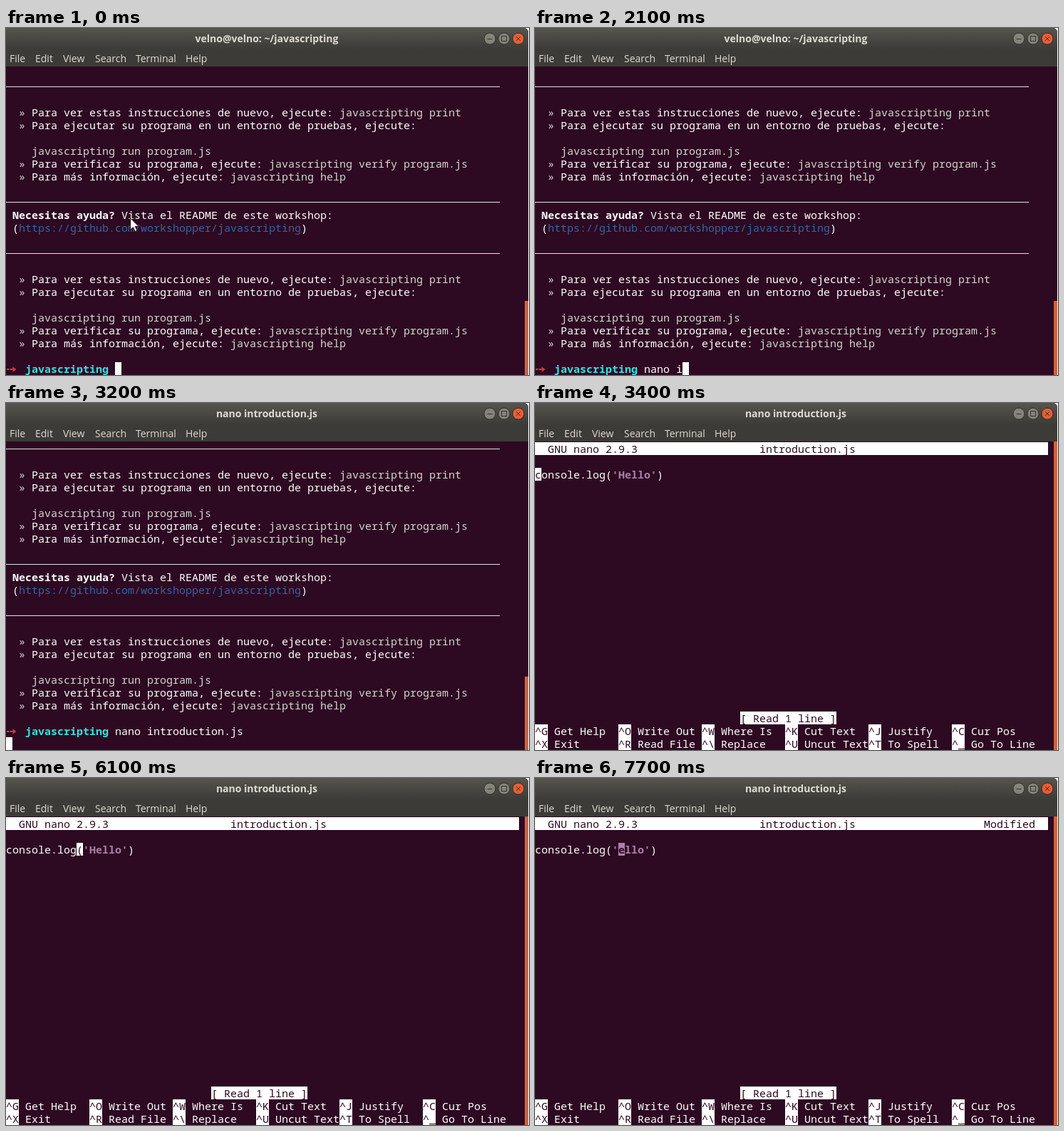
These frames come from a looping animation (734 by 487 pixels, 8000 ms). An HTML page:

```html
<!DOCTYPE html>
<html lang="es">
<head>
<meta charset="utf-8">
<title>Terminal</title>
<style>
  html, body { margin: 0; width: 100%; height: 100%; overflow: hidden; background: #fff; }
  #win { position: absolute; left: 0; top: 0; width: 733px; height: 487px; overflow: hidden;
    background: #3c3b37; border-radius: 0 6px 0 0; }
  #bar { position: absolute; width: 100%; height: 30px;
    background: linear-gradient(#56554f, #4b4a45 40%, #3c3b37); }
  #chrome { position: absolute; left: 0; top: 0; font: 14px "Open Sans", "Noto Sans", sans-serif; fill: #dfdbd2; }
  #title { font-weight: 700; text-anchor: middle; }
  #term { position: absolute; top: 54px; width: 100%; height: 433px; overflow: hidden; background: #2d0922; }
  #shell, #nano { position: absolute; left: 0; top: 1px; width: 720px; height: 432px; }
  #term span { position: absolute; height: 18px; white-space: pre; color: #fff;
    font: 15px/18px "Noto Sans Mono", "Liberation Mono", monospace; }
  #term .dim { color: #d3d7cf; }
  #term .link { color: #3465a4; }
  #term .bold { font-weight: 700; }
  #term .dir { font-weight: 700; color: #34e2e2; }
  #term .str { font-weight: 700; color: #ad7fa8; }
  #term .inv { background: #fff; color: #2d0922; }
  #term .strInv { background: #ad7fa8; color: #2d0922; font-weight: 700; }
  .rule { position: absolute; left: 0; width: 693px; height: 1px; background: #e6e1e4; }
  #arrow { position: absolute; left: 0; top: 414px; }
  #thumb { position: absolute; left: 728px; width: 5px; bottom: 0; background: #d0613a; }
  #mouse { position: absolute; left: 0; top: 0; }
</style>
</head>
<body>
<div id="win">
  <div id="bar"></div>
  <svg id="chrome" width="733" height="54">
    <text id="title" x="366" y="20"></text>
    <text x="5" y="48">File</text>
    <text x="41" y="48">Edit</text>
    <text x="80" y="48">View</text>
    <text x="125" y="48">Search</text>
    <text x="182" y="48">Terminal</text>
    <text x="252" y="48">Help</text>
    <g stroke="#32312d">
      <circle cx="679" cy="15" r="8" fill="#85837a"/>
      <circle cx="699" cy="15" r="8" fill="#85837a"/>
      <circle cx="719" cy="15" r="8" fill="#ee5c33"/>
      <path d="M675.5 15.5h7M695.5 11.5h7v7h-7zM716 12l6 6m0-6l-6 6" fill="none"/>
    </g>
  </svg>
  <div id="term">
    <div id="shell">
      <svg id="arrow" width="18" height="18">
        <path d="M1 10h3.5M5.5 10h7" stroke="#df382c" stroke-width="2"/>
        <path d="M9 6l5.5 4L9 14l1.2-4z" fill="#df382c"/>
      </svg>
    </div>
    <div id="nano"></div>
    <div id="thumb"></div>
  </div>
  <svg id="mouse" width="14" height="22">
    <path d="M.7 1v16l3.8-3.4 2.7 6 2.8-1.2-2.7-5.8h5z" fill="#fff" stroke="#1c1118"/>
  </svg>
</div>
<script>
const CELL = 9, ROW = 18, LOOP = 8000;
const $ = id => document.getElementById(id);
const shell = $('shell'), nano = $('nano');

function place(el, row, col) {
  el.style.left = col * CELL + 'px';
  el.style.top = row * ROW + 'px';
}

function put(box, row, col, text, cls = '') {
  const el = document.createElement('span');
  el.textContent = text;
  el.className = cls;
  place(el, row, col);
  box.appendChild(el);
  return el;
}

function rule(row) {
  const el = document.createElement('div');
  el.className = 'rule';
  el.style.top = row * ROW + 9 + 'px';
  shell.appendChild(el);
}

function hint(row, text, command = '') {
  put(shell, row, 2, '»', 'dim');
  put(shell, row, 4, text);
  put(shell, row, 5 + text.length, command, 'dim');
}

function help(row) {
  rule(row);
  hint(row + 2, 'Para ver estas instrucciones de nuevo, ejecute:', 'javascripting print');
  hint(row + 3, 'Para ejecutar su programa en un entorno de pruebas, ejecute:');
  put(shell, row + 5, 4, 'javascripting run program.js', 'dim');
  hint(row + 6, 'Para verificar su programa, ejecute:', 'javascripting verify program.js');
  hint(row + 7, 'Para más información, ejecute:', 'javascripting help');
}

// Shell screen
help(1);
rule(10);
put(shell, 11, 1, 'Necesitas ayuda?', 'bold');
put(shell, 11, 18, 'Vista el README de este workshop:');
put(shell, 12, 1, '(');
put(shell, 12, 2, 'https://github.com/workshopper/javascripting', 'link');
put(shell, 12, 46, ')');
help(14);
put(shell, 23, 3, 'javascripting', 'dir');
const typed = put(shell, 23, 17, '');
const caret = put(shell, 23, 17, ' ', 'inv');

// Editor screen
put(nano, 0, 0, ' '.repeat(80), 'inv');
put(nano, 0, 2, 'GNU nano 2.9.3', 'inv');
put(nano, 0, 35, 'introduction.js', 'inv');
const modified = put(nano, 0, 70, 'Modified', 'inv');
const call = 'console.log(';
put(nano, 2, 0, call);
const arg = put(nano, 2, call.length, '', 'str');
const paren = put(nano, 2, 0, ')');
const block = put(nano, 2, 0, '', 'inv');
put(nano, 21, 32, '[ Read 1 line ]', 'inv');
[
  ['^G Get Help', '^O Write Out', '^W Where Is', '^K Cut Text', '^J Justify', '^C Cur Pos'],
  ['^X Exit', '^R Read File', '^\\ Replace', '^U Uncut Text', '^T To Spell', '^_ Go To Line']
].forEach((keys, r) => keys.forEach((key, i) => {
  put(nano, 22 + r, i * 13, key.slice(0, 2), 'inv');
  put(nano, 22 + r, i * 13 + 3, key.slice(3));
}));

// Each track lists [start time, value]
const command = 'nano introduction.js ';
const typing = [[0, 0], [500, 1], [700, 2], [900, 3], [1000, 4], [1200, 5], [2100, 6],
  [2200, 7], [2400, 8], [2500, 9], [2800, 10], [2900, command.length]];
const moves = [[0, 0], [3700, 1], [4300, 0], [4600, 1], [4800, 3], [5000, 4], [5300, 6],
  [5700, 8], [5800, 9], [6100, 11], [6300, 12], [6600, 13], [7100, 14], [7700, 13]];
const pointer = [[0, [174, 266]], [200, [171, 260]], [400, [174, 261]], [600, null]];

function at(track, t) {
  let value;
  for (const [start, v] of track) if (t >= start) value = v;
  return value;
}

function show(el, on) {
  el.style.visibility = on ? 'visible' : 'hidden';
}

function draw(t) {
  const run = t >= 3200, edit = t >= 3400, changed = t >= 7700;
  $('title').textContent = run ? 'nano introduction.js' : 'velno@velno: ~/javascripting';
  shell.style.display = edit ? 'none' : 'block';
  nano.style.display = edit ? 'block' : 'none';
  shell.style.transform = run ? `translateY(${-ROW}px)` : 'none';
  $('thumb').style.top = (edit ? 0 : run ? 330 : 329) + 'px';

  const count = at(typing, t);
  typed.textContent = command.slice(0, count);
  if (run) place(caret, 24, 0);
  else place(caret, 23, 17 + count);
  caret.style.opacity = t >= 1800 && t < 1900 ? 0 : 1;

  const spot = at(pointer, t);
  show($('mouse'), spot);
  if (spot) $('mouse').style.transform = `translate(${spot[0]}px, ${spot[1]}px)`;

  const text = changed ? "'ello'" : "'Hello'";
  const end = call.length + text.length;
  const col = at(moves, t);
  arg.textContent = text;
  place(paren, 2, end);
  place(block, 2, col);
  block.textContent = (call + text + ')')[col];
  block.className = col >= call.length && col < end ? 'strInv' : 'inv';
  modified.style.display = changed ? 'block' : 'none';
}

const begin = performance.now();
function tick() {
  draw((performance.now() - begin) % LOOP);
  requestAnimationFrame(tick);
}
tick();
</script>
</body>
</html>
```
